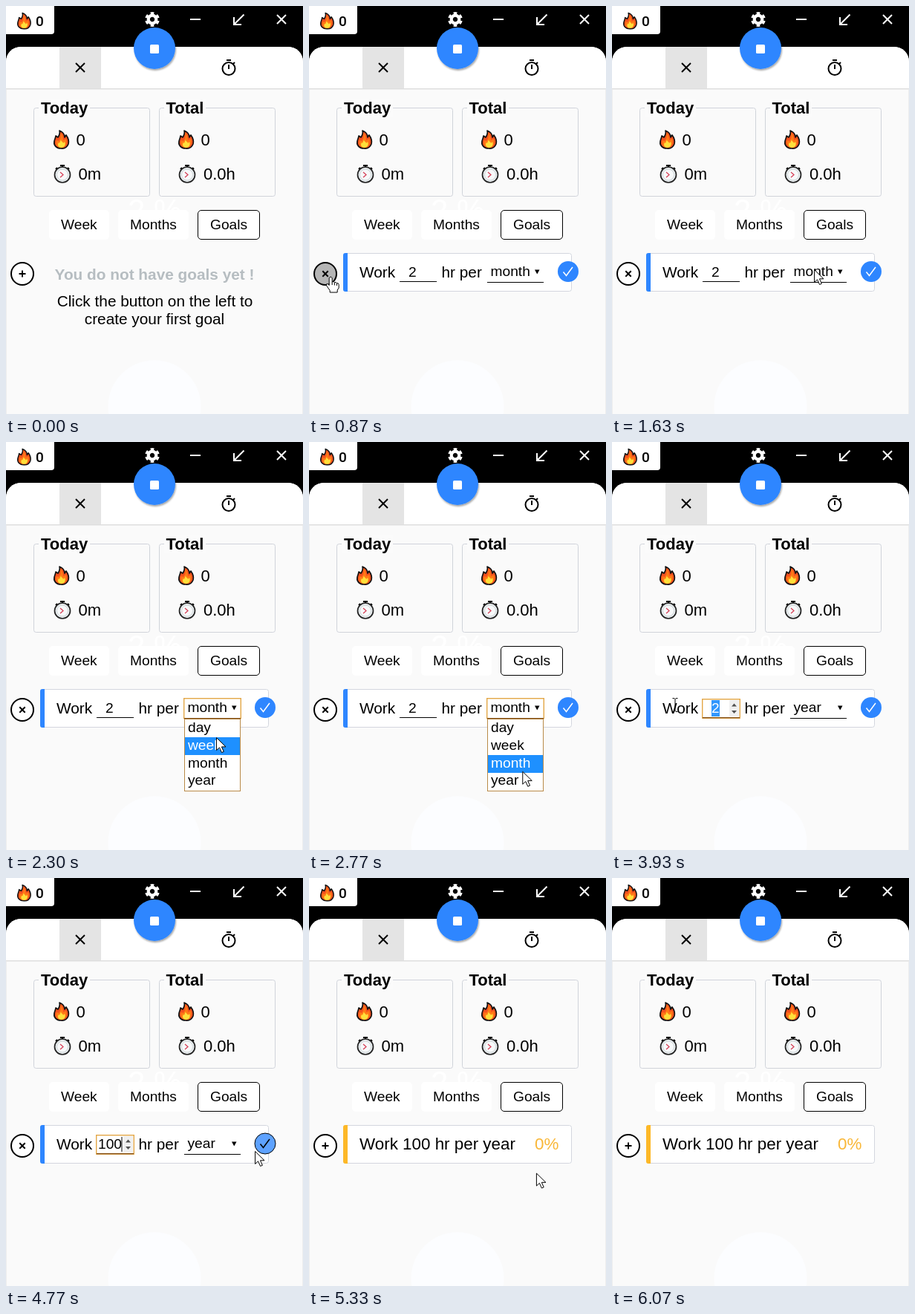
An HTML page for the animation above (6530 ms loop, 400 px wide and 550 px high).

```html
<!DOCTYPE html>
<html lang="en">
<head>
<meta charset="utf-8">
<title>Work goals</title>
<style>
html, body { margin: 0; width: 100%; height: 100%; overflow: hidden; background: #000; }
svg { display: block; width: 400px; height: 550px; font-family: "Liberation Sans", Arial, sans-serif; }
text { white-space: pre; }
.line { fill: none; stroke: #000; stroke-width: 2; }
.white { stroke: #fff; }
.card { fill: none; stroke: #d0d3da; }
.big { font-size: 22px; }
.mid { font-size: 19.2px; }
.note { font-size: 20.8px; }
.goal { font-size: 22.4px; }
.bold { font-weight: bold; }
.focus { fill: none; stroke: #e3a747; stroke-width: 1.4; }
.brown { stroke: #7d4a12; stroke-width: 1.3; }
</style>
</head>
<body>
<svg viewBox="0 0 400 550">
  <defs>
    <filter id="soft" x="-20%" y="-20%" width="150%" height="150%">
      <feDropShadow dx="1" dy="2" stdDeviation="1" flood-opacity=".35"/>
    </filter>
    <g id="fire">
      <path d="M8 1C13 3 15 7 15 10L17 7C20 11 21 15 20 19C18 24 14 25.500 10 25C4 25 0 21 1 16C1 13 3 11 3 8L6 10C8 7 9 4 8 1Z" fill="#f4511e" stroke="#111" stroke-width="1.700" stroke-linejoin="round"/>
      <path d="M9 4C12 6 13 10 13 14L17 12C19 19 16 23 11 24C5 24 2 20 4 14L7 15C10 11 10 8 9 4Z" fill="#ff7a16"/>
      <path d="M10 13C10 16 13 16 13 18L15 16C17 21 14 24 10 24C6 23 5 20 7 17L8 18Z" fill="#ffe03b"/>
    </g>
    <g id="watch">
      <path class="line" d="M9 2h6M12 2v4M19 5l2 2M5 5L3 7" stroke-width="2.400"/>
      <circle cx="12" cy="14.500" r="10.500" fill="#e9edef" stroke="#222" stroke-width="1.700"/>
      <circle cx="12" cy="14.500" r="7.500" fill="#f7f9fa" stroke="#cfd6d8"/>
      <path d="M9 11l4 3.500-4 3.500" fill="none" stroke="#d43a52" stroke-width="1.200"/>
    </g>
  </defs>

  <rect width="400" height="550"/>
  <path d="M0 550V75a20 20 0 0 1 20-20H380a20 20 0 0 1 20 20V550Z" fill="#fafafa"/>
  <path d="M0 111V75a20 20 0 0 1 20-20H380a20 20 0 0 1 20 20V111Z" fill="#fff"/>
  <path d="M0 111.500H400" stroke="#ddd"/>
  <path d="M0 112.500H400M.5 112V550M399.500 112V550" stroke="#eee"/>
  <rect x="72" y="55" width="56" height="56" fill="#e4e4e4"/>
  <path d="M0 0H65V34a4 4 0 0 1-4 4H0Z" fill="#fff"/>
  <use href="#fire" transform="translate(15 8.500) scale(.89)"/>
  <text x="40" y="27" font-size="19" font-weight="500" font-family="Roboto, sans-serif">0</text>

  <g fill="none" stroke="#fff" transform="translate(197 18)">
    <circle r="5.300" stroke-width="4.200"/>
    <circle r="8.300" stroke-width="3.200" pathLength="360" stroke-dasharray="32 28" stroke-dashoffset="-14"/>
  </g>
  <path class="line white" d="M248 18H262M320.500 11.500L307.500 24.500M307 15V25H317M365 12L377 24M377 12L365 24"/>
  <path class="line" d="M94 77L106 89M106 77L94 89M297 73H303M300 79V85M306 78L308 76"/>
  <circle class="line" cx="300" cy="84.500" r="8.500"/>
  <circle cx="200" cy="57" r="28" fill="#2e86ff" filter="url(#soft)"/>
  <rect x="194" y="52" width="12" height="12" rx="1.500" fill="#fff"/>

  <circle cx="200" cy="540" r="62.500" fill="#fcfdff"/>
  <text x="164" y="290" font-size="42" fill="#fff">2 %</text>

  <rect class="card" x="37.500" y="137.500" width="156" height="119" rx="3"/>
  <rect class="card" x="206.500" y="137.500" width="156" height="119" rx="3"/>
  <path d="M44 125H113V150H44ZM213 125H269V150H213Z" fill="#fbfbfb"/>
  <g class="big">
    <text class="bold" x="47" y="145">Today</text>
    <text class="bold" x="215.500" y="145">Total</text>
    <text x="94.500" y="188">0</text>
    <text x="262.500" y="188">0</text>
    <text x="97.500" y="234">0m</text>
    <text x="266" y="234">0.0h</text>
  </g>
  <use href="#fire" x="64" y="167"/>
  <use href="#fire" x="232" y="167"/>
  <use href="#watch" x="64" y="213"/>
  <use href="#watch" x="232" y="213"/>

  <g fill="#fff">
    <rect x="58" y="275" width="81" height="40" rx="5"/>
    <rect x="151" y="275" width="95" height="40" rx="5"/>
    <rect x="258.500" y="275.500" width="83" height="39" rx="4.500" stroke="#000"/>
  </g>
  <g class="mid">
    <text x="74" y="301">Week</text>
    <text x="167" y="301">Months</text>
    <text x="275" y="301">Goals</text>
  </g>

  <circle id="button" class="line" cx="22" cy="361" r="15"/>
  <path id="plus" class="line" d="M17.500 361H26.500M22 356.500V365.500" stroke-width="1.500"/>
  <path id="cross" class="line" d="M18.300 357.300L25.700 364.700M25.700 357.300L18.300 364.700"/>

  <g id="empty" class="note" text-anchor="middle">
    <text class="bold" x="200" y="369" fill="#b6bdc1">You do not have goals yet !</text>
    <text x="200.500" y="405">Click the button on the left to</text>
    <text x="200" y="429">create your first goal</text>
  </g>

  <g id="row">
    <rect x="46.500" y="333.500" width="307" height="51" rx="3" fill="#fff" stroke="#d3d6de"/>
    <path id="bar" d="M52 333V385H49a3 3 0 0 1-3-3V336a3 3 0 0 1 3-3Z"/>
  </g>

  <g id="form">
    <g class="note">
      <text x="68" y="366">Work</text>
      <text x="178.500" y="366">hr per</text>
    </g>
    <path d="M122 371.500H172M240 372.500H316" stroke="#000"/>
    <rect id="marked" x="134" y="348" width="11" height="22" fill="#3297fd"/>
    <text id="hours" class="mid" y="365"></text>
    <path id="caret" d="M156 349V369" stroke="#000"/>
    <g id="spin">
      <rect x="158" y="348" width="13" height="22" fill="#f0f0f0"/>
      <path d="M161 356.500h7l-3.500-4zM161 362h7l-3.500 4z" fill="#505050"/>
    </g>
    <g id="inputFocus">
      <rect class="focus" x="121.700" y="346.700" width="50.600" height="25.500"/>
      <path class="brown" d="M122 371.700H172"/>
    </g>
    <text id="period" class="mid" x="244.500" y="364"></text>
    <path d="M304 355.500h6.500l-3.250 6z"/>
    <g id="selectFocus">
      <rect class="focus" x="239.700" y="345.700" width="76.600" height="27"/>
      <path class="brown" d="M240 372.700H316"/>
    </g>
    <circle id="check" cx="349" cy="358" r="14"/>
    <path id="tick" d="M342.500 358.500L346.500 363.500L355 352" fill="none" stroke-width="1.500"/>
    <g id="menu" class="mid">
      <rect x="240.500" y="373.500" width="75" height="97" fill="#fff" stroke="#b98a48"/>
      <rect id="pick" x="241" width="74" height="24" fill="#1e90ff"/>
    </g>
  </g>

  <g id="done" class="goal">
    <text x="68" y="366">Work 100 hr per year</text>
    <text x="304" y="366" fill="#f9b738">0%</text>
  </g>

  <g id="cursor" fill="#fff" stroke="#000" stroke-linejoin="round">
    <path id="arrow" d="M.5.5V17.500L4.500 13.800L7.500 20.500L10.300 19.300L7.400 12.800H13Z"/>
    <path id="hand" d="M-2 1.500Q0-1.500 2 1.500V7Q4 5.500 5.200 7.700Q7.400 6.400 8.200 8.700Q10.700 8 11 10.500V15L9 18V21H-1V18.500L-5.500 12Q-6.500 9-4 9.500L-2 11.500ZM2 7V11M5.200 8V11.500M8.200 9V12"/>
    <path id="beam" d="M-3.500-8.500H-1L0-7.500L1-8.500H3.500M0-7.500V8.500M-3.500 9.500H-1L0 8.500L1 9.500H3.500" fill="none"/>
  </g>
</svg>
<script>
const LOOP = 6530;
const $ = id => document.getElementById(id);
const show = (id, on) => $(id).style.display = on ? "" : "none";

// Pointer path: time, x, y
const path = [
  [70, 58, 536], [250, 50, 470], [450, 36, 395], [630, 27, 364], [840, 27, 364],
  [870, 29, 365], [1000, 50, 370], [1250, 105, 370], [1500, 169, 362],
  [1630, 272, 355], [1800, 281, 358], [1950, 281, 359], [2170, 282, 398],
  [2300, 283, 398], [2600, 286, 428], [2870, 288, 453], [2970, 288, 453],
  [3230, 199, 379], [3570, 152, 353], [3630, 152, 353], [3930, 85, 354],
  [4430, 85, 354], [4600, 215, 385], [4770, 335, 368], [4870, 344, 365],
  [4950, 344, 365], [5500, 289, 412], [5600, 284, 416], [6070, 80, 556]
];

const options = ["day", "week", "month", "year"];
options.forEach((word, i) => {
  const text = document.createElementNS("http://www.w3.org/2000/svg", "text");
  text.setAttribute("x", 245);
  text.setAttribute("y", 391 + i * 23.8);
  text.textContent = word;
  $("menu").append(text);
});

function pointer(t) {
  const i = path.findIndex(p => p[0] > t);
  if (i < 1) return [-99, -99];
  const [t0, x0, y0] = path[i - 1], [t1, x1, y1] = path[i];
  const k = (t - t0) / (t1 - t0);
  return [x0 + (x1 - x0) * k, y0 + (y1 - y0) * k];
}

function draw() {
  const t = performance.now() % LOOP;
  const [x, y] = pointer(t);
  const near = (cx, cy, r) => Math.hypot(x - cx, y - cy) < r;
  const editing = t >= 730 && t < 4900;
  const done = t >= 4900;
  const onButton = near(22, 361, 16);
  const onCheck = editing && near(349, 358, 18);
  const onInput = x > 121 && x < 173 && y > 345 && y < 373;
  const inputFocus = t >= 3630;
  const open = t >= 1920 && t < 2970;

  $("button").style.fill = onButton ? "#b5b5b5" : "#fff";
  show("plus", !editing);
  show("cross", editing);
  show("empty", t < 730);
  show("row", t >= 730);
  show("form", editing);
  show("done", done);
  $("bar").style.fill = done ? "#fdb827" : "#2e86ff";

  const typed = t < 4230 ? "2" : "100".slice(0, t < 4300 ? 1 : t < 4370 ? 2 : 3);
  const marked = inputFocus && t < 4230 && x < 140;
  $("hours").textContent = typed;
  $("hours").setAttribute("x", t < 4230 ? 134 : 124);
  $("hours").style.fill = marked ? "#fff" : "#000";
  show("marked", marked);
  show("caret", t >= 4230);
  $("caret").setAttribute("transform", `translate(${(typed.length - 3) * 10.7} 0)`);
  show("spin", onInput || inputFocus);
  show("inputFocus", inputFocus);

  $("period").textContent = t < 2970 ? "month" : "year";
  show("selectFocus", t >= 1920 && !inputFocus);
  show("menu", open);
  const row = y < 374 ? 2 : Math.min(3, Math.floor((y - 374) / 23.8));
  $("pick").setAttribute("y", 374 + row * 24 - (row > 2));
  $("menu").querySelectorAll("text").forEach((el, i) => el.style.fill = i === row ? "#fff" : "#000");

  $("check").style.fill = onCheck ? "#5ea2ff" : "#2e86ff";
  $("check").style.stroke = onCheck ? "#000" : "none";
  $("tick").style.stroke = onCheck ? "#000" : "#fff";

  const hand = onButton || (t > 4800 && t < 5000);
  const beam = !hand && editing && x > 66 && x < 158 && y > 345 && y < 366;
  $("cursor").setAttribute("transform", `translate(${x} ${y})`);
  show("hand", hand);
  show("beam", beam);
  show("arrow", !hand && !beam);
  requestAnimationFrame(draw);
}
draw();
</script>
</body>
</html>
```
